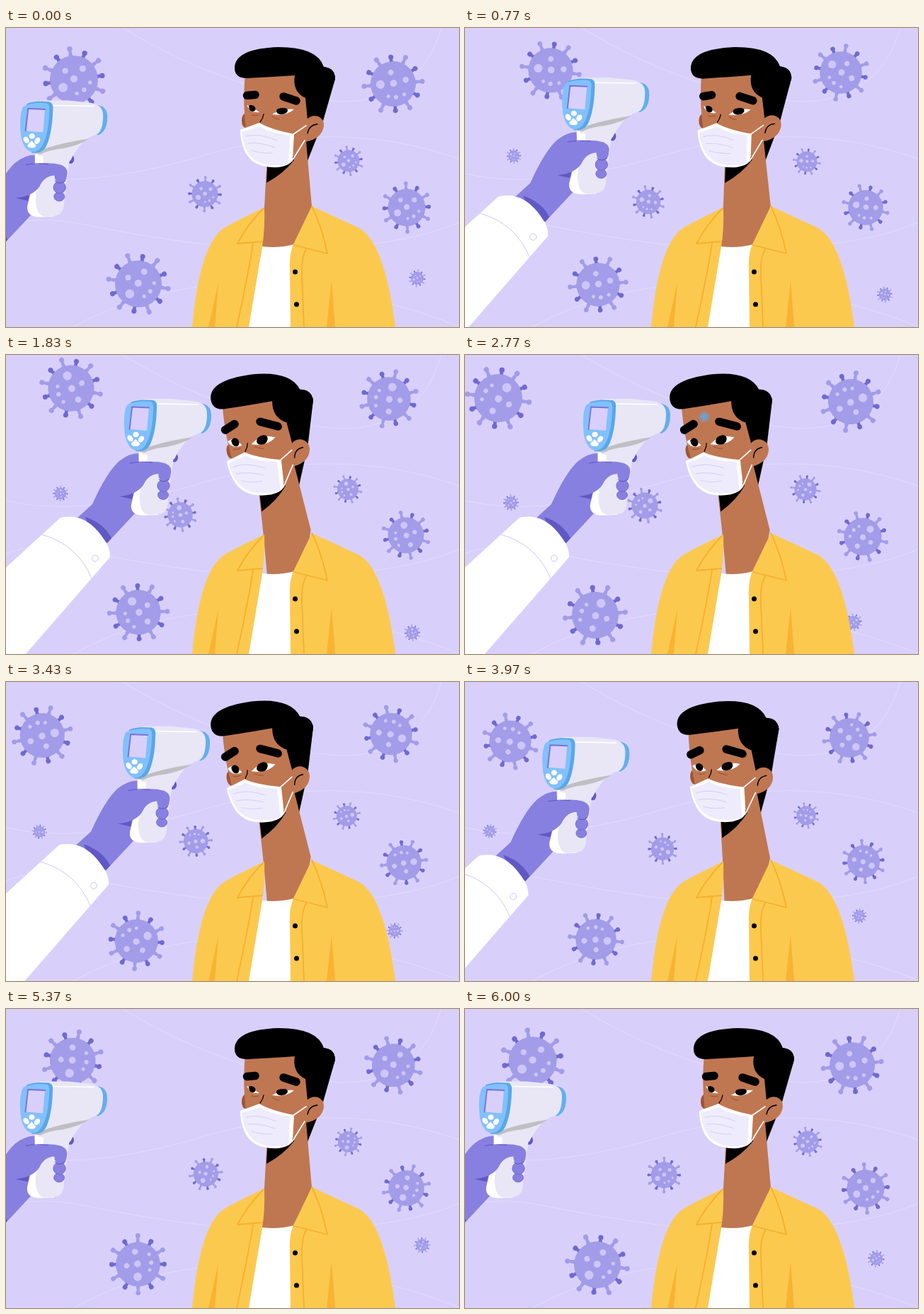
An HTML page that plays this animation: 640 by 423 pixels, repeating every 6.03 s.

```html
<!DOCTYPE html>
<html lang="en">
<head>
<meta charset="utf-8">
<title>Temperature check</title>
<style>
  html, body { margin: 0; height: 100%; overflow: hidden; background: #d8d0fb; }
  svg { display: block; width: 100%; height: 100%; }
  .line { fill: none; stroke-linecap: round; stroke-linejoin: round; }
  .skin { fill: #bf7752; }
  .hand { fill: #8780e0; }
  .dark { fill: #6058c4; }
  .yellow { fill: #fcc94f; }
  .orange { stroke: #f5b02c; stroke-width: 1.8; }
</style>
</head>
<body>
<svg viewBox="0 0 640 423" preserveAspectRatio="none">
  <defs>
    <g id="virus"></g>
    <radialGradient id="glow">
      <stop offset="0" stop-color="#5fa8e6"/>
      <stop offset=".45" stop-color="#6f9fce" stop-opacity=".85"/>
      <stop offset="1" stop-color="#7fa0c4" stop-opacity="0"/>
    </radialGradient>
  </defs>

  <g class="line" stroke="#e3dcfd">
    <path d="M165 0Q320 94 470 104Q584 106 615 0"/>
    <path d="M0 206Q100 230 260 186Q460 122 640 185"/>
    <path d="M0 281Q40 264 110 278Q290 314 400 314Q560 310 640 275"/>
    <path d="M95 423Q200 365 330 362Q500 366 640 422"/>
  </g>

  <g id="viruses"></g>

  <g id="head">
    <path d="M400 60L449 55Q465 57 465 72L447 135L426 188L416 150Z"/>
    <path class="skin" d="M369 180L365 254L360 320L408 320L432 252L424 160L410 140Z"/>
    <path d="M370 180L368 219Q392 206 407 187L404 175Z"/>
    <ellipse cx="338" cy="131" rx="5" ry="10" fill="#a05431"/>
    <path class="skin" d="M338 64Q335 95 337 122L340 160L400 188L424 162L430 125V60Z"/>
    <path d="M323 56Q324 29 385 27Q440 27 449 55Q465 57 465 72L447 129Q438 120 426 130L423 99Q404 90 408 67Q380 69 340 71Q323 71 323 56Z"/>
    <path class="skin" d="M424 130Q432 122 441 125Q450 129 449 139Q446 157 423 161Z"/>
    <path class="line" d="M426 149Q428 137 440 136" stroke="#000" stroke-width="1.4"/>

    <path fill="#fff" d="M340 109Q348 112 358 119Q346 121 340 109" data-to="M337 117Q346 109 356 124Q342 129 337 117"/>
    <path d="M343 110Q348 107 352 112Q354 118 348 118Q343 117 343 110" data-to="M342 116Q347 110 352 116Q354 124 348 125Q342 124 342 116"/>
    <path fill="#fff" d="M376 122Q390 113 407 115Q396 125 376 122" data-to="M369 124Q385 110 404 118Q390 130 369 124"/>
    <path d="M382 117Q383 113 392 113Q398 113 398 117Q397 121 391 122Q382 123 382 117" data-to="M377 121Q378 114 388 113Q394 114 393 119Q391 126 384 126Q377 126 377 121"/>
    <g class="line" stroke="#9a4f2e" stroke-width="1">
      <path d="M347 123Q352 125 357 123" data-to="M343 128Q348 130 353 128"/>
      <path d="M376 125Q380 129 386 129" data-to="M373 128Q379 131 385 132"/>
    </g>
    <path class="line" d="M364 122Q363 128 359 133" stroke="#000" stroke-width="1.3"/>
    <g class="line" stroke="#000" stroke-width="11.5">
      <path d="M340.500 95.500L352 94.500" data-to="M336 100.300L350.500 93.300"/>
      <path d="M392 97L410 103" data-to="M386.400 94L410 103"/>
    </g>

    <path class="line" d="M405 151L424 138M404 188L422 159" stroke="#fff" stroke-width="1.6"/>
    <path fill="#fff" d="M331 144Q350 137 358 134Q372 143 407 150L405 186Q403 194 385 197Q346 199 336 171Q331 158 331 144Z"/>
    <path fill="#eeebfc" d="M333 147Q350 142 358 139Q374 149 401 152L399 192Q393 194 382 194Q349 195 338 169Q334 158 333 147Z"/>
    <path class="line" d="M339 153Q358 148 382 159M342 163Q358 161 380 169M347 173Q360 178 376 177" stroke="#d5cdf6"/>
  </g>

  <path fill="#fff" d="M362 309Q385 312 407 306L404 423H342Z"/>
  <path class="yellow" d="M263 423Q273 313 304 286Q312 279 365 254Q366 285 362 309L343 423Z"/>
  <path class="yellow" d="M432 252L499 283Q535 304 550 423H402L401 340Q400 320 406 306Z"/>
  <path fill="#f9b233" d="M300 360L286 423H295ZM460 357L453 423H465Z"/>
  <g class="line orange">
    <path d="M364 255Q341 278 327 305L362 302M349 304Q344 340 326 423"/>
    <path d="M432 252Q446 280 454 319L407 307M424 313Q417 325 418 350L421 423"/>
  </g>
  <circle cx="408.500" cy="345" r="3.500"/>
  <circle cx="410.500" cy="391" r="3.500"/>

  <circle id="dot" cx="338" cy="87.500" r="9" fill="url(#glow)"/>

  <g id="arm">
    <ellipse class="dark" cx="238" cy="145" rx="5" ry="6.500"/>
    <path class="hand" d="M98 233L122 211Q142 166 160 150Q174 139 187 139L192 200L184 222L143 266Z"/>
    <path class="dark" d="M112 229Q138 238 149 259L143 266L118 245ZM160 200L180 194L178 204Z"/>
    <path fill="#fff" d="M188 136H204L215 226L193 227Q175 226 177 211L187 170Z"/>
    <path fill="#e9e6f6" d="M200 134L199 165Q187 190 189 207Q191 227 204 226L216 225Q229 224 229 205L236 150L243 128Z"/>
    <path class="hand" d="M150 192Q165 153 190 152Q210 149 224 153Q235 157 233 167Q231 173 217 168Q201 168 194 184Q184 198 160 200Z"/>
    <g class="hand" stroke="#6a62cd" stroke-width=".8">
      <ellipse cx="222" cy="198" rx="7.500" ry="6.500"/>
      <ellipse cx="222.500" cy="185" rx="8.700" ry="8.500"/>
    </g>
    <ellipse class="hand" cx="224" cy="168" rx="8.800" ry="12"/>
    <path class="line" d="M175 153Q192 150 206 152M216 176Q222 182 230 176" stroke="#5d54c4"/>

    <path fill="#63afec" d="M272 68Q290 69 290 85Q290 106 277 111L270 108Z"/>
    <path fill="#e9e6f6" d="M195 62H235L264 65Q284 67 284 83Q284 105 275 110Q261 114 253 124Q243 136 238 147L192 140Z"/>
    <path fill="#bfbfc3" d="M187 137Q207 125 264 116Q252 125 227 130Q207 132 196 138Z"/>
    <path class="line" d="M214 69L271 70" stroke="#fff" stroke-width="1.6"/>
    <path fill="#58a7ea" d="M176 67Q187 62 208 64Q214 65 213 76Q212 110 203 128Q197 138 183 136Z"/>
    <path fill="#82c0fc" d="M174 69Q190 64 204 66Q209 67 208 77Q207 110 198 126Q192 136 183 135Q172 132 168 113Q165 86 170 73Q171 70 174 69Z"/>
    <path fill="#d8d0fb" d="M177 74L202 74L199 107L174 105Z"/>
    <path class="line" d="M174.500 105L178 73.500L202 74.500" stroke="#7873d8" stroke-width="2"/>
    <g fill="#fff">
      <ellipse cx="183.500" cy="112.500" rx="4" ry="3.800"/>
      <ellipse cx="175.500" cy="118" rx="3.600" ry="5" transform="rotate(-35 175.500 118)"/>
      <ellipse cx="191" cy="119" rx="3.600" ry="5" transform="rotate(35 191 119)"/>
      <path d="M183 119L189 125Q189 130 182 129Q177 129 177 125Z"/>
    </g>

    <path fill="#fff" d="M-6 306L76 231Q80 228 95 229Q122 232 143 268Q147 276 147 286L27 424H-6Z"/>
    <path class="line" d="M51 254Q101 268 121 316" stroke="#cfc7f5"/>
    <circle class="line" cx="126" cy="287.500" r="4.500" stroke="#cfc7f5"/>
  </g>
</svg>

<script>
const LOOP = 6030;
const get = id => document.getElementById(id);

// One virus, body radius 33: twelve spikes, then the body and its pale spots.
const PALE = '#cdc6f8', BODY = '#a29ce9', DEEP = '#6f69d3';
const SPOTS = [[0, -1, 5], [-15, 11, 6.3], [12, -15, 4.5], [-12, -12, 4], [22, 4, 2.7], [4, 19, 2.6], [14, 14, 3.2]];
const disc = (x, y, r, fill) => `<circle cx="${x}" cy="${y}" r="${r}" fill="${fill}"/>`;
let art = '';
for (let i = 0; i < 12; i++) {
  const color = i % 2 ? DEEP : BODY, reach = i % 2 ? 39 : 42.5;
  art += `<g transform="rotate(${22 + i * 30})"><path d="M28 -3.500L${reach} -1.500V1.500L28 3.500Z" fill="${color}"/>${disc(reach, 0, 3.6, color)}</g>`;
}
get('virus').innerHTML = art + disc(0, 0, 33, BODY) + SPOTS.map(s => disc(...s, PALE)).join('');

// Drift: radius, starting angle, then the points visited at TIMES.
const TIMES = [0, 770, 1830, 2770, 3970, 4730];
const SIZES = [1, .93, .96, 1, .87, .89];
const viruses = [
  [34, 0, [96, 121, 92, 47, 64, 92], [73, 60, 47, 61, 84, 73]],
  [32, 33, [547, 531, 541, 545, 543, 545], [79, 63, 62, 66, 79, 78]],
  [8.5, 20, [45, 69, 77, 65, 35, 40], [190, 181, 196, 209, 211, 200]],
  [18.5, 10, [281, 259, 246, 254, 279, 280], [235, 246, 226, 213, 236, 234]],
  [15.5, 0, [484, 483, 483, 481, 482, 483], [188, 189, 190, 190, 189, 188]],
  [26.5, 6, [566, 566, 565, 562, 563, 565], [254, 254, 255, 257, 254, 253]],
  [9, 15, [581, 593, 574, 549, 557, 591], [354, 377, 393, 378, 331, 320]],
  [33, -13, [187, 188, 187, 184, 185, 186], [362, 363, 364, 368, 364, 361]]
];
get('viruses').innerHTML = viruses.map(() => '<use href="#virus"/>').join('');
const nodes = get('viruses').children;

// Smooth closed curve through the values at TIMES.
const count = TIMES.length;
const timeAt = i => TIMES[(i + count) % count] + Math.floor(i / count) * LOOP;
function curve(values, t) {
  const at = i => values[(i + count) % count];
  const slope = i => (at(i + 1) - at(i - 1)) / (timeAt(i + 1) - timeAt(i - 1));
  let i = count - 1;
  while (TIMES[i] > t) i--;
  const span = timeAt(i + 1) - timeAt(i), u = (t - timeAt(i)) / span, v = 1 - u;
  return v * v * ((1 + 2 * u) * at(i) + u * span * slope(i))
       + u * u * ((1 + 2 * v) * at(i + 1) - v * span * slope(i + 1));
}

const ramp = (t, start, length) => Math.min(1, Math.max(0, (t - start) / length));
const smooth = (t, start, length) => {
  const u = ramp(t, start, length);
  return u * u * (3 - 2 * u);
};

const NUMBER = /-?\d+(\.\d+)?/g;
const morphs = [...document.querySelectorAll('[data-to]')].map(el => ({
  el, from: el.getAttribute('d'), to: el.dataset.to.match(NUMBER)
}));

function draw() {
  const t = performance.now() % LOOP;

  const size = curve(SIZES, t);
  viruses.forEach(([radius, angle, xs, ys], i) => nodes[i].setAttribute('transform',
    `translate(${curve(xs, t)} ${curve(ys, t)}) rotate(${angle + 360 * t / LOOP}) scale(${radius / 33 * size})`));

  const away = (1 - ramp(t, 0, 1400)) ** 2 + smooth(t, 3330, 1500);
  get('arm').setAttribute('transform', `translate(${-147 * away} ${40.5 * away})`);

  const lean = smooth(t, 490, 1300) - smooth(t, 3400, 1550);
  get('head').setAttribute('transform',
    `matrix(1 ${-.106 * lean} ${.165 * lean} 1 ${-42.9 * lean} ${41.4 * lean})`);
  for (const { el, from, to } of morphs) {
    let n = 0;
    el.setAttribute('d', from.replace(NUMBER, a => +a + (to[n++] - a) * lean));
  }

  get('dot').setAttribute('opacity', smooth(t, 2000, 300) - smooth(t, 2950, 300));
  requestAnimationFrame(draw);
}
draw();
</script>
</body>
</html>
```
